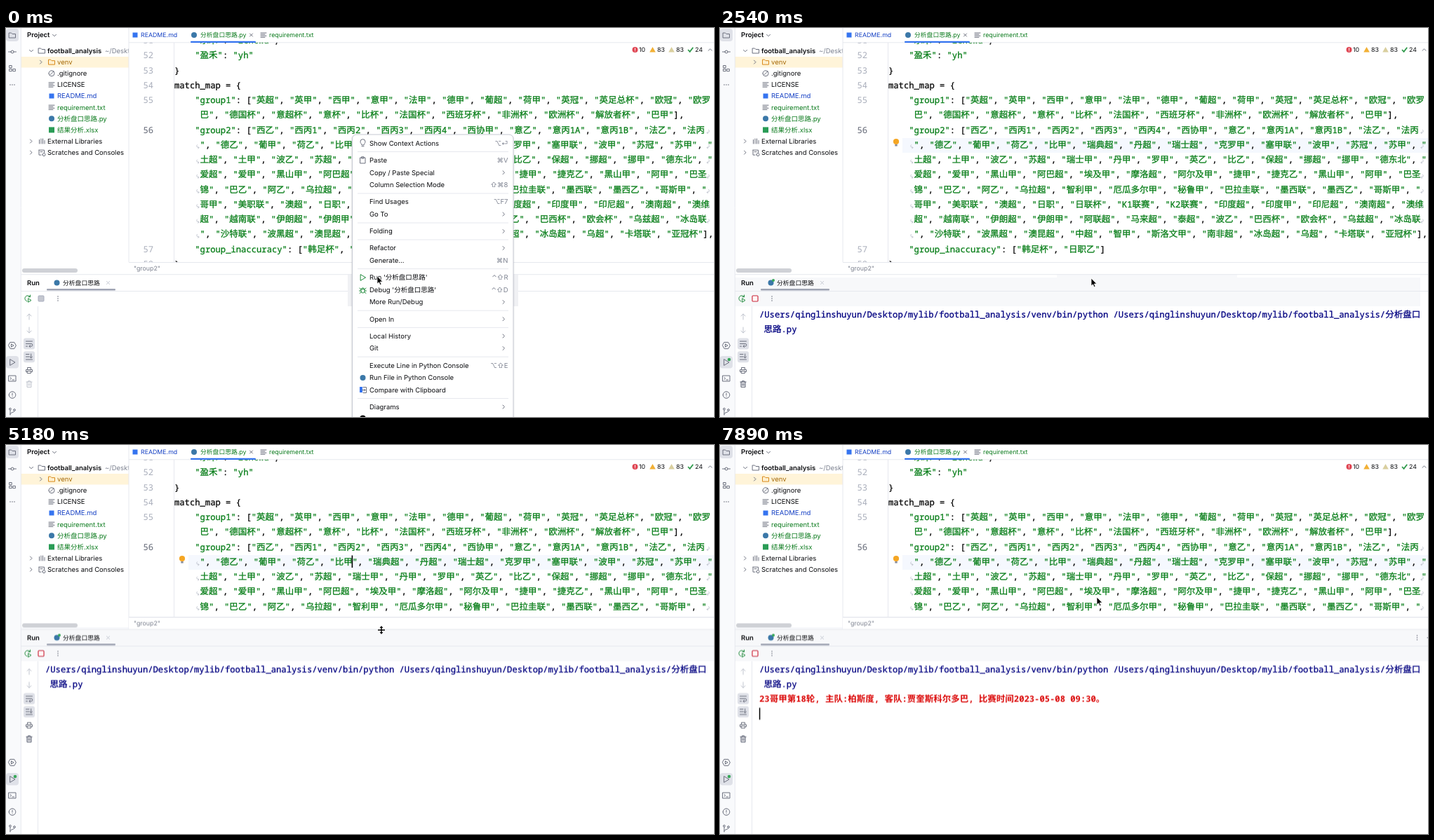
Write an HTML page that moves like this. It is 1009 px wide and 555 px high and loops after 8 s.

```html
<!DOCTYPE html>
<html lang="zh-CN">
<head>
<meta charset="utf-8">
<title>Run a script</title>
<style>
html, body { margin: 0; width: 100%; height: 100%; overflow: hidden; background: #fff; }
svg { display: block; width: 1009px; height: 555px; }
text { font: 9.5px Inter, 'Noto Sans CJK SC', 'Noto Sans CJK', 'DejaVu Sans', sans-serif; color: #0c0d10; fill: currentColor; white-space: pre; text-rendering: geometricPrecision; }
.tab { font-size: 8.8px; }
.b { font-weight: 600; }
.r { text-anchor: end; }
.dim { color: #7d8290; }
.blue { color: #1540c4; }
.green { color: #0a7a1c; }
.tan { color: #a46704; }
.code, .num, .out, .err text { font: 12.2px 'Noto Sans Mono', 'Noto Sans CJK SC', 'Noto Sans CJK', monospace; }
.han { font-size: 12.5px; font-family: 'Noto Sans CJK SC', 'Noto Sans CJK', sans-serif; }
.code, .op, .out { stroke: currentColor; stroke-width: .3; }
.code { color: #067d17; }
.op { color: #080808; fill: currentColor; }
.num { color: #a9aebb; text-anchor: end; }
.num.cur { color: #5f6472; }
.out { color: #000080; }
.err text { color: #db0808; font-weight: 700; }
.i { fill: none; stroke: #6c707e; stroke-width: 1; stroke-linecap: round; stroke-linejoin: round; }
.pale { stroke: #c0c4ce; }
.go { stroke: #208a3c; }
.line { stroke: #e6e8ee; fill: none; }

.menu, .hot, .ghost, .live, .log, .bulb, .err, .wide, .dots, .caret, .caret2, .arrow, .resize, .panel, .pointer {
  animation: 8s step-end infinite;
}
.menu { animation-name: menu; }
.hot { animation-name: hot; }
.ghost { animation-name: ghost; }
.live { animation-name: live; }
.log { animation-name: log; }
.bulb { animation-name: bulb; }
.err { animation-name: err; }
.wide { animation-name: wide; }
.dots { animation-name: dots; }
.caret { animation-name: caret; }
.caret2 { animation-name: caret2; }
.arrow { animation-name: arrow; }
.resize { animation-name: resize; }
.panel { animation-name: panel; }
.pointer { animation-name: pointer; }
@keyframes menu { 0% { opacity: 1 } 11.25% { opacity: 0 } }
@keyframes hot { 0% { opacity: 0 } 1.875% { opacity: 1 } }
@keyframes ghost { 0%, 13% { opacity: 0 } 11.25% { opacity: 1 } }
@keyframes live { 0% { opacity: 0 } 13% { opacity: 1 } }
@keyframes log { 0% { opacity: 0 } 14.875% { opacity: 1 } }
@keyframes bulb { 0% { opacity: 0 } 22.375% { opacity: 1 } }
@keyframes err { 0% { opacity: 0 } 67% { opacity: 1 } }
@keyframes wide { 0% { opacity: 0 } 56.125% { opacity: 1 } }
@keyframes dots { 0%, 64.75% { opacity: 0 } 56.125%, 68.875% { opacity: 1 } }
@keyframes caret {
  0%, 18.625%, 31.75%, 44.875%, 58%, 70.75%, 83.75%, 96.75% { opacity: 0 }
  13%, 26.125%, 37.375%, 50.5%, 64.75%, 76.25%, 89.375% { opacity: 1 }
}
@keyframes caret2 { 0% { opacity: 0 } 98.625% { opacity: 1 } }
@keyframes arrow { 0%, 68.875% { opacity: 1 } 56.125% { opacity: 0 } }
@keyframes resize { 0%, 68.875% { opacity: 0 } 56.125% { opacity: 1 } }
@keyframes panel {
  0% { transform: translateY(0) }
  59.875% { transform: translateY(1px) }
  64.75% { transform: translateY(-88.6px) }
}
@keyframes pointer {
  0% { transform: translate(529px, 354px) }
  1.875% { transform: translate(529px, 357px) }
  54.25% { transform: translate(531px, 355px) }
  56.125% { transform: translate(532px, 352px) }
  58% { transform: translate(533px, 347px) }
  59.875% { transform: translate(534px, 318px) }
  62.875% { transform: translate(535px, 265px) }
  64.75% { transform: translate(535px, 264px) }
  68.875% { transform: translate(538px, 300px) }
  70.75% { transform: translate(543px, 360px) }
  72.625% { transform: translate(545px, 398px) }
  83.75% { transform: translate(547px, 393px) }
  85.625% { transform: translate(551px, 385px) }
  87.5% { transform: translate(553px, 370px) }
  89.375% { transform: translate(552px, 350px) }
  91.25% { transform: translate(549px, 325px) }
  93.125% { transform: translate(545px, 295px) }
  95% { transform: translate(541px, 260px) }
  96.75% { transform: translate(538px, 232px) }
  98.625% { transform: translate(537px, 217px) }
}
</style>
</head>
<body>
<svg id="stage" viewBox="0 0 1009 555"></svg>
<script>
const text = (x, y, s, cls = '') => `<text x="${x}" y="${y}" class="${cls}">${s}</text>`;
const label = (x, mid, s, cls) => text(x, mid + 3.4, s, cls);
const rect = (x, y, w, h, fill, more = '') => `<rect x="${x}" y="${y}" width="${w}" height="${h}" fill="${fill}" ${more}/>`;
const icon = (x, y, d, cls = '') => `<path class="i ${cls}" transform="translate(${x} ${y})" d="${d}"/>`;
const dot = (x, y, r, fill) => `<circle cx="${x}" cy="${y}" r="${r}" fill="${fill}"/>`;
const group = (cls, ...parts) => `<g class="${cls}">${parts.join('')}</g>`;
const han = s => s.replace(/[\u3000-\u9fff]+/g, '<tspan class="han">$&</tspan>');

const RIGHT = 'M-1.5-2.5L1 0L-1.5 2.5', DOWN = 'M-2.5-1.2L0 1.3L2.5-1.2', CROSS = 'M-2-2L2 2M2-2L-2 2';
const FOLDER = 'M-4.5-3.5H-1.5L0-2H4.5V3.5H-4.5Z', LINES = 'M-4-3H4M-4-.9H2M-4 1.2H4M-4 3.3H2';
const PLAY = 'M-3-4.2L4 0L-3 4.2Z', RING = 'M-4 0a4 4 0 1 0 8 0a4 4 0 1 0-8 0';
const TRASH = 'M-4-3H4M-1.5-3V-4.4H1.5V-3M-3-3V4.4H3V-3M-1-.8V2.2M1-.8V2.2';
const more = (x, y, across) => [-3, 0, 3].map(d => dot(across ? x + d : x, across ? y : y + d, .8, '#6c707e')).join('');
const pyMark = (x, y) => dot(x, y, 4, '#3b78a8');
const mdMark = (x, y) => rect(x - 3.5, y - 3.5, 7, 7, '#3574f0');
const script = '分析盘口思路';

function project() {
  const row = i => 32.5 + 16.13 * i;
  const file = (i, name, cls, mark) => label(73, row(i), name, cls) + mark;
  return rect(21, 0, 154, 352, '#fff') + group('wide', rect(21, 260, 154, 92, '#f7f8fb'))
    + rect(21, 41, 154, 15.5, '#fff4d9')
    + label(30, 10, 'Project', 'b') + icon(69, 10.5, DOWN)
    + icon(36, row(0), DOWN) + icon(51, row(0), FOLDER)
    + label(59, row(0), 'football_analysis', 'b') + label(141, row(0), '~/Desktop', 'dim')
    + icon(50, row(1), RIGHT)
    + file(1, 'venv', 'tan', `<path d="${FOLDER}" transform="translate(65 ${row(1)})" fill="#fff0cf" stroke="#d98a1c"/>`)
    + file(2, '.gitignore', '', icon(65, row(2), RING + 'M-2.8 2.8L2.8-2.8'))
    + file(3, 'LICENSE', '', icon(65, row(3), LINES))
    + file(4, 'README.md', 'blue', mdMark(65, row(4)))
    + file(5, 'requirement.txt', 'green', icon(65, row(5), LINES))
    + file(6, script + '.py', 'green', pyMark(65, row(6)))
    + file(7, '结果分析.xlsx', 'green', rect(61, row(7) - 4, 8, 8, '#2a9c56'))
    + icon(36, row(8), RIGHT) + icon(51, row(8), 'M-3.5 3.5V-2M-1 3.5V-3.5M1.5 3.5V-3.5M4 3.5V-1')
    + label(59, row(8), 'External Libraries')
    + icon(36, row(9), RIGHT) + icon(51, row(9), 'M-4-3.5H3.5V0M-4-3.5V3.5H-1M-2-1H1M1 3a2 2 0 1 0 4 0a2 2 0 1 0-4 0')
    + label(59, row(9), 'Scratches and Consoles');
}

// [line number, indent, content]
const source = [
  [51, 4, '"乐禾": "lehewu",'],
  [52, 4, '"盈禾": "yh"'],
  [53, 0, '}'],
  [54, 0, 'match_map = {'],
  [55, 4, '"group1": ["英超", "英甲", "西甲", "意甲", "法甲", "德甲", "葡超", "荷甲", "英冠", "英足总杯", "欧冠", "欧罗'],
  ['', 5, '巴", "德国杯", "意超杯", "意杯", "比杯", "法国杯", "西班牙杯", "非洲杯", "欧洲杯", "解放者杯", "巴甲"],'],
  [56, 4, '"group2": ["西乙", "西丙1", "西丙2", "西丙3", "西丙4", "西协甲", "意乙", "意丙1A", "意丙1B", "法乙", "法丙'],
  ['', 5, '", "德乙", "葡甲", "荷乙", "比甲", "瑞典超", "丹超", "瑞士超", "克罗甲", "塞甲联", "波甲", "苏冠", "苏甲", "'],
  ['', 5, '土超", "土甲", "波乙", "苏超", "瑞士甲", "丹甲", "罗甲", "英乙", "比乙", "保超", "挪超", "挪甲", "德东北", "'],
  ['', 5, '爱超", "爱甲", "黑山甲", "阿巴超", "埃及甲", "摩洛超", "阿尔及甲", "捷甲", "捷克乙", "黑山甲", "阿甲", "巴圣'],
  ['', 5, '锦", "巴乙", "阿乙", "乌拉超", "智利甲", "厄瓜多尔甲", "秘鲁甲", "巴拉圭联", "墨西联", "墨西乙", "哥斯甲", "'],
  ['', 5, '哥甲", "美职联", "澳超", "日职", "日联杯", "K1联赛", "K2联赛", "印度超", "印度甲", "印尼超", "澳南超", "澳维'],
  ['', 5, '超", "越南联", "伊朗超", "伊朗甲", "阿联超", "马来超", "泰超", "波乙", "巴西杯", "欧会杯", "乌兹超", "冰岛联'],
  ['', 5, '", "沙特联", "波黑超", "澳昆超", "中超", "智甲", "斯洛文甲", "南非超", "冰岛超", "乌超", "卡塔联", "亚冠杯"],'],
  [57, 4, '"group_inaccuracy": ["韩足杯", "日职乙"]'],
  [58, 0, '}']
];

function editor() {
  let quoted = false;
  const paint = s => s.split('"').map((part, i) => {
    if (i) quoted = !quoted;
    return quoted || !part ? han(part) : `<tspan class="op">${part}</tspan>`;
  }).join('"');
  const lines = source.map(([no, indent, s], i) => {
    const y = 22 + 21.25 * i;
    let out = text(210, y, no, no === 56 ? 'num cur' : 'num') + text(240 + 7.32 * indent, y, paint(s), 'code');
    if (i > 6 && i < 14) out += icon(273.5, y - 1, 'M-1-3C-3-1-1 1.5 1.5 1M0-.3L1.5 1L.3 2.3', 'pale');
    if (i > 5 && i < 13) out += icon(1000.5, y - 1, 'M1-3C3-1 1 1.5-1.5 1M0-.3L-1.5 1L-.3 2.3', 'pale');
    return out;
  }).join('');
  const warn = (x, fill) => `<path d="M${x} 27l4.3 7.6h-8.6z" fill="${fill}"/>`;
  return rect(175, 0, 834, 352, '#fff')
    + group('ghost', rect(480, 157, 257, 21, '#f5f8fe'))
    + group('live', rect(260, 157, 749, 21, '#f5f8fe'))
    + '<path class="line" d="M239.5 21V340"/>' + lines
    + group('bulb', dot(251, 162, 4.1, '#f5a623'), rect(249.3, 166, 3.4, 2.6, '#8a8e9b'))
    + group('caret', rect(492.6, 157.5, 1.6, 17.5, '#000'))
    + rect(175, 0, 834, 20.3, '#fff') + '<path class="line" d="M175 20.8H1009M175 0V334"/>'
    + mdMark(184, 10) + label(192, 10, 'README.md', 'tab blue')
    + pyMark(268, 10) + label(277, 10, script + '.py', 'tab green') + icon(349.5, 10, CROSS)
    + rect(263, 18.7, 93, 2.4, '#3574f0', 'rx="1"')
    + icon(367, 10, LINES) + label(375, 10, 'requirement.txt', 'tab green')
    + dot(896.5, 31, 4, '#e04855') + rect(896, 28.6, 1, 3, '#fff') + rect(896, 32.4, 1, 1, '#fff') + label(902, 31, '10', 'tab')
    + warn(921.5, '#f2b035') + label(928, 31, '83', 'tab')
    + warn(948.5, '#d9cf9f') + label(955, 31, '83', 'tab')
    + '<path d="M972 31l2.6 2.8 4.6-6" fill="none" stroke="#2f9a4b" stroke-width="1.8"/>' + label(982, 31, '24', 'tab')
    + icon(1003.5, 31, 'M-2.5 1.3L0-1.2L2.5 1.3');
}

function runPanel() {
  const lib = '/Users/qinglinshuyun/Desktop/mylib/football_analysis/';
  return rect(23, 343, 79, 6, '#cfd1d6', 'rx="3"')
    + rect(175, 334, 834, 17.5, '#fff') + '<path class="line" d="M175 334.5H1009"/>'
    + label(182, 342.8, '"group2"', 'tab dim')
    + rect(21, 351.5, 988, 300, '#fff')
    + group('ghost', rect(480, 352, 257, 45, '#f5f7fc'))
    + group('live', rect(480, 352, 257, 4, '#f7f8fa'), rect(21, 356, 977, 41, '#f7f8fa'))
    + group('wide', rect(21, 352, 988, 45, '#f7f8fa'))
    + '<path class="line" d="M21 351.7H1009M21 375.5H1009M45.5 397V650"/>'
    + label(30, 363.5, 'Run', 'b') + pyMark(72.5, 363.5) + label(81, 363.5, script, 'tab')
    + group('live', dot(76, 360, 2, '#39a85a')) + icon(145.5, 363.5, CROSS, 'pale')
    + rect(58, 372, 98, 2.4, '#9fa4b3', 'rx="1"')
    + icon(31, 386, 'M3.5-2.5A4.2 4.2 0 1 0-1 4M3.5-5V-2.3H1', 'go') + icon(33, 388, 'M-1-2L3 .5L-1 3Z', 'go')
    + rect(46, 382, 8, 8, '#c4c7d0', 'stroke="#a8adbd" rx="1"')
    + group('live', rect(46, 382, 8, 8, '#fff5f5', 'stroke="#db3b4b" stroke-width="1.2" rx="1"'))
    + more(74, 386)
    + group('dots', more(993.5, 363.5), icon(1010, 363.5, 'M-2 0H3'))
    + icon(33, 412, 'M0 4V-4M-3-1L0-4L3-1', 'pale') + icon(33, 431, 'M0-4V4M-3 1L0 4L3 1', 'pale')
    + rect(25, 442.5, 16, 16, '#dfe1e8', 'rx="3"') + icon(33, 450.5, 'M-4.5-3.5H4.5M-4.5 0H3a1.8 1.8 0 0 1 0 3.6H0M1.5 2L0 3.6L1.5 5M-4.5 3.6H-2.5')
    + rect(25, 461.3, 16, 16, '#dfe1e8', 'rx="3"') + icon(33, 469, 'M-4.5-3.5H0M-4.5 0H0M-4.5 4H4.5M2.7-4V1.5M.8 0L2.7 1.8L4.6 0')
    + icon(33, 488.5, 'M-2.5-1V-4H2.5V-1M-2.5 2H-4.5V-1H4.5V2H2.5M-2.5 1H2.5V4H-2.5Z')
    + icon(33, 508, TRASH, 'pale') + group('live', icon(33, 508, TRASH))
    + group('log', text(56, 412.6, han(`${lib}venv/bin/python ${lib}分析盘口`), 'out'), text(62.5, 433.9, han('思路.py'), 'out'))
    + group('err', text(56, 455.2, han('23哥甲第18轮, 主队:柏斯度, 客队:贾奎斯科尔多巴, 比赛时间2023-05-08 09:30。')))
    + group('caret2', rect(55.8, 463.5, 1.5, 17, '#000'));
}

function strip() {
  return rect(0, 0, 21, 555, '#f9fafc') + '<path class="line" d="M21.3 0V555"/>'
    + rect(0, 1, 18, 18, '#dfe1e8', 'rx="4"') + icon(9, 10.5, FOLDER)
    + icon(9, 34, 'M-5.5 0H-2M2 0H5.5M-2 0a2 2 0 1 0 4 0a2 2 0 1 0-4 0')
    + icon(9, 57.5, 'M-4-4H-.8V-.8H-4ZM-4 1H-.8V4.2H-4ZM1.2 1H4.4V4.2H1.2Z') + more(9, 81, true)
    + icon(9, 453, 'M-2.8-4.6H2.8L5.4 0L2.8 4.6H-2.8L-5.4 0ZM-1.2-2L2 0L-1.2 2Z')
    + rect(0, 468, 18, 17.5, '#dfe1e8', 'rx="4"') + icon(9, 477, PLAY) + group('live', dot(13, 473, 2.3, '#39a85a'))
    + icon(9, 500, 'M-5-4H5V4H-5ZM-3-1.5L-1.3 0L-3 1.5M0 2H2.5')
    + icon(9, 523.5, 'M-4.8 0a4.8 4.8 0 1 0 9.6 0a4.8 4.8 0 1 0-9.6 0M0-2.5V.5M0 2.4V2.5')
    + icon(9, 547, 'M-3-2V5M-4.4-3.4a1.4 1.4 0 1 0 2.8 0a1.4 1.4 0 1 0-2.8 0M1.6-2a1.4 1.4 0 1 0 2.8 0a1.4 1.4 0 1 0-2.8 0M3-.6C3 2-3 1-3 4');
}

// [middle, label, shortcut or '>']
const items = [
  [164.5, 'Show Context Actions', '⌥⏎'], [188.5, 'Paste', '⌘V'], [206.2, 'Copy / Paste Special', '>'],
  [223.8, 'Column Selection Mode', '⇧⌘8'], [248, 'Find Usages', '⌥F7'], [265.7, 'Go To', '>'],
  [290, 'Folding', '>'], [314, 'Refactor', '>'], [331.6, 'Generate...', '⌘N'],
  [355.8, `Run '${script}'`, '⌃⇧R'], [373.4, `Debug '${script}'`, '⌃⇧D'], [391, 'More Run/Debug', '>'],
  [415.2, 'Open In', '>'], [439.5, 'Local History', '>'], [457, 'Git', '>'],
  [481.2, 'Execute Line in Python Console', '⌥⇧E'], [498.8, 'Run File in Python Console'],
  [516.4, 'Compare with Clipboard'], [540.5, 'Diagrams', '>'], [558.2, 'Create Note...']
];

function menu() {
  const rows = items.map(([y, name, key]) => label(518, y, name)
    + (key === '>' ? icon(709.5, y, RIGHT) : key ? label(715.5, y, key, 'r dim') : '')).join('');
  const rules = [176.5, 236, 278, 302, 343.6, 403.2, 427.4, 469.2, 528.5].map(y => `M501 ${y}H716`).join('');
  return group('menu',
    rect(487, 352, 243, 45, '#f0f1f4'),
    rect(491.5, 152, 233, 420, '#000', 'rx="7" opacity=".06"'),
    rect(493.5, 152, 229.5, 420, '#fff', 'rx="6" stroke="#c6c9d2"'),
    `<path class="line" d="${rules}"/>`,
    group('hot', rect(497, 347, 223, 17.6, '#d4e2ff', 'rx="3"')),
    rows,
    icon(508.5, 164, 'M-1.7 2.5C-1.7 1-3.5 .3-3.5-1.8a3.5 3.5 0 0 1 7 0C3.5 .3 1.7 1 1.7 2.5ZM-1.5 4.8H1.5'),
    icon(508.5, 188.5, 'M-3.5-3.5H3.5V4.5H-3.5ZM-1.5-4.7H1.5V-2.5H-1.5Z'),
    icon(508.5, 356, PLAY, 'go'),
    icon(508.5, 374, 'M-2.5-1.5H2.5V1.5a2.5 2.5 0 0 1-5 0ZM-1.8-1.5a1.8 1.8 0 0 1 3.6 0M-5 1H-2.5M2.5 1H5M-4.5-3L-2.5-1M4.5-3L2.5-1M-4.5 4.5L-2.3 2.7M4.5 4.5L2.3 2.7', 'go'),
    pyMark(508.5, 499),
    rect(504, 512, 4, 8, '#3574f0'), icon(510, 516.5, 'M-1-4H3.5V4H-1M-2 0H2M.5-1.5L2 0L.5 1.5'),
    dot(508.5, 557, 4.6, '#111'));
}

const pointer = group('pointer',
  group('arrow', '<path d="M0 0V11L2.5 8.8L4.2 12.6L6 11.8L4.3 8.1H7.8Z" fill="#000" stroke="#fff" stroke-width=".8"/>'),
  group('resize', '<path d="M-5.5 0H5.5M0-4V4" stroke="#fff" stroke-width="3"/>'
    + '<path d="M-5 0H5M0-4V4" stroke="#000" stroke-width="1.5"/><path d="M0-6L2.4-3H-2.4ZM0 6L2.4 3H-2.4Z"/>'));

document.getElementById('stage').innerHTML =
  project() + editor() + group('panel', runPanel()) + strip() + menu() + pointer;
</script>
</body>
</html>
```
